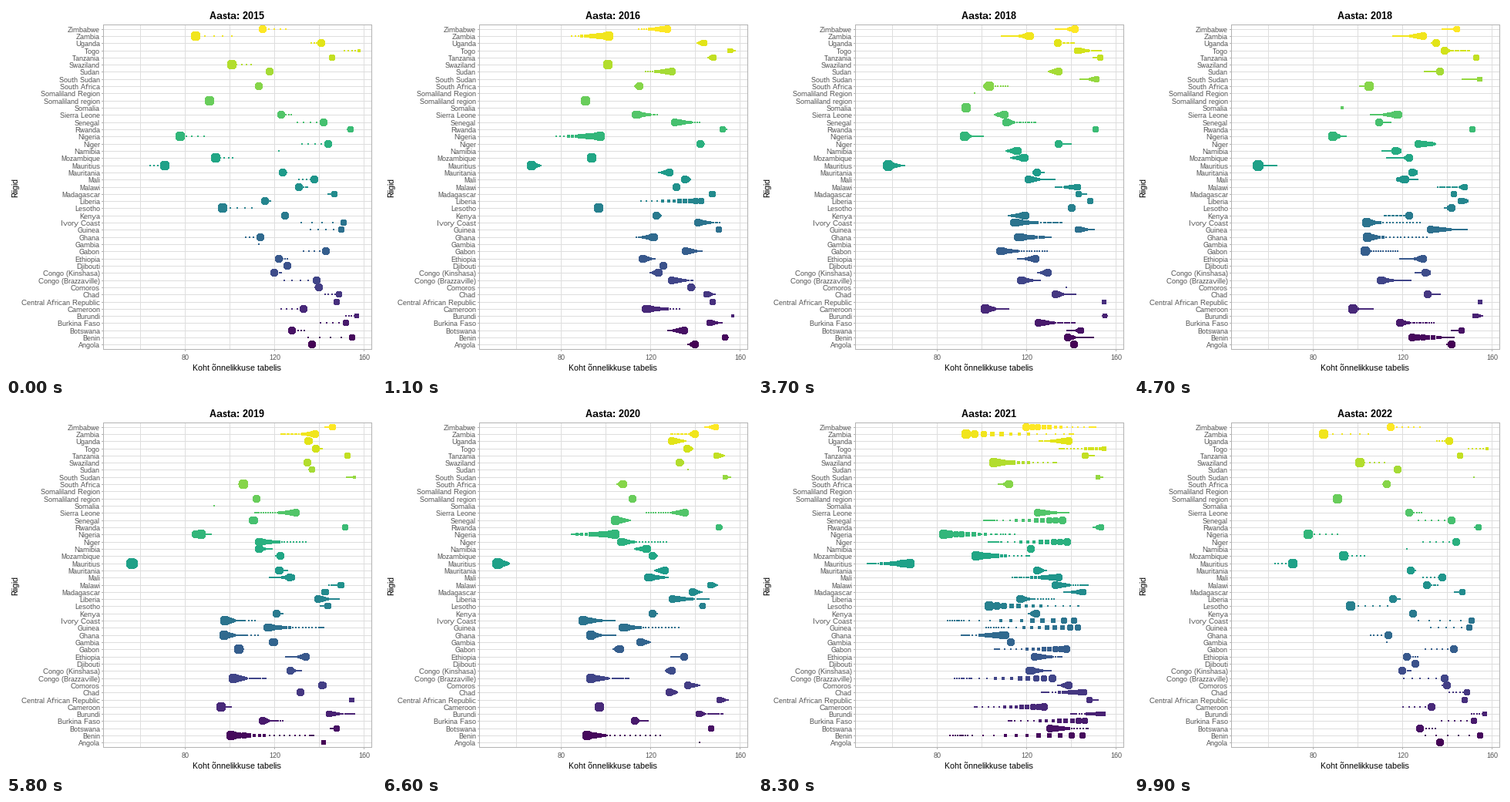
A matplotlib script that plays this animation: 480 px wide and 480 px high, repeating every 10000 ms.

```python
import numpy as np
import matplotlib as mpl
import matplotlib.pyplot as plt
from matplotlib.animation import FuncAnimation

# Full hinting gives the crisp, pixel-fitted look of screen text
mpl.rcParams.update({"font.family": "Liberation Sans",
                     "text.hinting": "native",
                     "text.hinting_factor": 1})

FRAMES, WAKE = 100, 20
KEYS = np.array([0, 14, 28, 42, 57, 71, 85, 99])   # frame of each year
LEFT, RIGHT, TOP, BOTTOM = 126.5, 474.5, 24.5, 445.5
GRID, FRAME, LABEL = "#dedede", "#b3b3b3", "#4d4d4d"
_ = np.nan

# Rank per country, 2015 to 2020
A_TO_G = {
    "Angola": (137, 141, 140, 142, _, _),
    "Benin": (155, 153, 143, 136, 102, 86),
    "Botswana": (128, 137, 142, 146, 148, 147),
    "Burkina Faso": (152, 145, 134, 121, 115, 112),
    "Burundi": (157, 157, 154, 156, 145, 140),
    "Cameroon": (133, 114, 107, 99, 96, 98),
    "Central African Republic": (148, _, 155, 155, 155, 149),
    "Chad": (149, 144, 137, 131, 132, 127),
    "Comoros": (140, 138, _, _, 142, 134),
    "Congo (Brazzaville)": (139, 127, 124, 114, 103, 88),
    "Congo (Kinshasa)": (120, 125, 126, 132, 127, 131),
    "Djibouti": (126, _, _, _, _, _),
    "Ethiopia": (122, 115, 119, 127, 134, 136),
    "Gabon": (143, 134, 118, 103, 104, 108),
    "Gambia": (_, _, _, _, 120, 113),
}
G_TO_N = {
    "Ghana": (114, 124, 131, 108, 98, 91),
    "Guinea": (150, 151, 149, 140, 118, 102),
    "Ivory Coast": (151, 139, 128, 107, 99, 85),
    "Kenya": (125, 122, 112, 124, 121, 121),
    "Lesotho": (97, _, 139, 141, 144, 143),
    "Liberia": (116, 150, 148, 149, 141, 124),
    "Madagascar": (147, 148, 144, 143, 143, 137),
    "Malawi": (131, 132, 136, 147, 150, 145),
    "Mali": (138, 135, 127, 118, 128, 114),
    "Mauritania": (124, 130, 123, 126, 122, 129),
    "Mauritius": (71, 66, 64, 55, 57, 49),
    "Mozambique": (94, _, 113, 123, 123, 120),
    "Namibia": (_, 113, 111, 119, 113, 122),
    "Niger": (144, 142, 135, 134, 114, 103),
    "Nigeria": (78, 103, 95, 91, 85, 115),
}
R_TO_Z = {
    "Rwanda": (154, 152, 151, 151, 152, 150),
    "Senegal": (142, 128, 115, 109, 111, 101),
    "Sierra Leone": (123, 111, 106, 113, 129, 139),
    "Somalia": (_, 76, 93, _, _, _),
    "Somaliland region": (91, _, _, _, 112, _),
    "Somaliland Region": (_, 97, _, _, _, _),
    "South Africa": (113, 116, 101, 105, 106, 109),
    "South Sudan": (_, 143, 147, 154, 156, 152),
    "Sudan": (118, 133, 130, 137, _, _),
    "Swaziland": (101, _, _, _, 135, 132),
    "Tanzania": (146, 149, 153, 153, 153, 148),
    "Togo": (158, 155, 150, 139, 139, 135),
    "Uganda": (141, 145, 133, 135, 136, 126),
    "Zambia": (85, 106, 116, 125, 138, 141),
    "Zimbabwe": (115, 131, 138, 144, 146, 151),
}
# Frames at which a country loses its trail at once
CUTS = {"South Sudan": 0, "Djibouti": 14, "Central African Republic": 14,
        "Zambia": 14, "Somalia": 28, "Somaliland region": 71,
        "Namibia": 71, "Gambia": 71}

table = {**A_TO_G, **G_TO_N, **R_TO_Z}
names = list(table)
n = len(names)
ranks = np.array(list(table.values()), float)

# Dot size follows the happiness score, estimated from the distance to the last place
LAST = np.array([158, 157, 155, 156, 156, 153])
score = np.interp(LAST - ranks,
                  [0, 1, 2, 4, 8, 17, 32, 45, 61, 73, 87, 104],
                  [2.8, 2.95, 3.25, 3.45, 3.65, 3.95, 4.37, 4.64, 4.9, 5.13, 5.48, 6.1])
sizes = 1 + 5 * np.sqrt((score - 2.7) / 3.4)

# The last two years repeat the first
ranks = np.hstack([ranks, ranks[:, :1], ranks[:, :1]])
sizes = np.hstack([sizes, sizes[:, :1], sizes[:, :1]])

step = (BOTTOM - TOP) / (n + 0.2)
rows = BOTTOM - step * (0.6 + np.arange(n))
colors = plt.get_cmap("viridis")(np.linspace(0, 1, n))
cuts = np.array([CUTS.get(name, -1) for name in names])


def to_x(rank):
    return LEFT + (rank - 43.55) * (RIGHT - LEFT) / 119.9


def state(g):
    """Ranks and sizes at one frame; a leaving country waits for the next year."""
    k = min(np.searchsorted(KEYS, g, "right") - 1, len(KEYS) - 2)
    u = (g - KEYS[k]) / (KEYS[k + 1] - KEYS[k])

    def mix(v):
        a, b = v[:, k], v[:, k + 1]
        return np.where(np.isnan(ranks[:, k + 1]), a, a + (b - a) * u)

    return mix(ranks), mix(sizes)


states = [state(g) for g in range(FRAMES)]


def dots(t):
    """Centres, areas and colours of the dots and their trails, on whole pixels."""
    xy, area, col = [], [], []
    for age in range(WAKE - 1, -1, -1):
        g = t - age
        rank, size = states[g % FRAMES]
        cut = (cuts >= 0) & (g < cuts) & (t >= cuts)
        ok = ~np.isnan(rank) & ~cut
        r = 0.375 * (2.845 * size[ok] * (1 - age / WAKE) ** 3 + 0.945)
        r = np.maximum(1, np.floor(r + 0.5))
        xy.append(np.floor(np.column_stack([to_x(rank), rows])[ok]))
        area.append((2 * r) ** 2)
        col.append(colors[ok])
    return np.vstack(xy), np.concatenate(area), np.vstack(col)


fig = plt.figure(figsize=(480 / 72, 480 / 72), dpi=72, facecolor="white")
ax = fig.add_axes([0, 0, 1, 1])
ax.set_xlim(0, 480)
ax.set_ylim(480, 0)
ax.axis("off")


def line(xs, ys, color, z):
    ax.plot(xs, ys, color=color, lw=1, zorder=z, antialiased=False, snap=False,
            solid_capstyle="projecting", solid_joinstyle="miter")


def mid(v):
    return np.floor(v) + 0.5


for rank in range(60, 161, 20):
    x = mid(to_x(rank))
    line([x, x], [TOP, BOTTOM], GRID, 1)
    if rank % 40 == 0:
        line([x, x], [BOTTOM, BOTTOM + 2], FRAME, 1)
        ax.text(x, 458.6, str(rank), size=9, color=LABEL, ha="center")
for name, y in zip(names, rows):
    line([LEFT, RIGHT], [mid(y)] * 2, GRID, 1)
    line([LEFT - 2, LEFT], [mid(y)] * 2, FRAME, 1)
    ax.text(122, np.floor(y) + 4, name, size=9, color=LABEL, ha="right")
line([LEFT, RIGHT, RIGHT, LEFT, LEFT], [TOP, TOP, BOTTOM, BOTTOM, TOP], FRAME, 4)

ax.text(300, 473, "Koht õnnelikkuse tabelis", size=11, ha="center")
ax.text(17, 235, "Riigid", size=11, rotation=90, ha="right", va="center")
title = ax.text(300, 17, "", size=13, weight="bold", ha="center")
points = ax.scatter([], [], linewidths=0, antialiased=False, snap=False, zorder=3)


def draw(t):
    xy, area, col = dots(t)
    points.set_offsets(xy)
    points.set_sizes(area, fig.dpi)
    points.set_facecolor(col)
    title.set_text(f"Aasta: {round(2015 + 7 * t / (FRAMES - 1))}")
    return points, title


anim = FuncAnimation(fig, draw, frames=FRAMES, interval=100, repeat=True,
                     repeat_delay=0)
plt.show()
```
